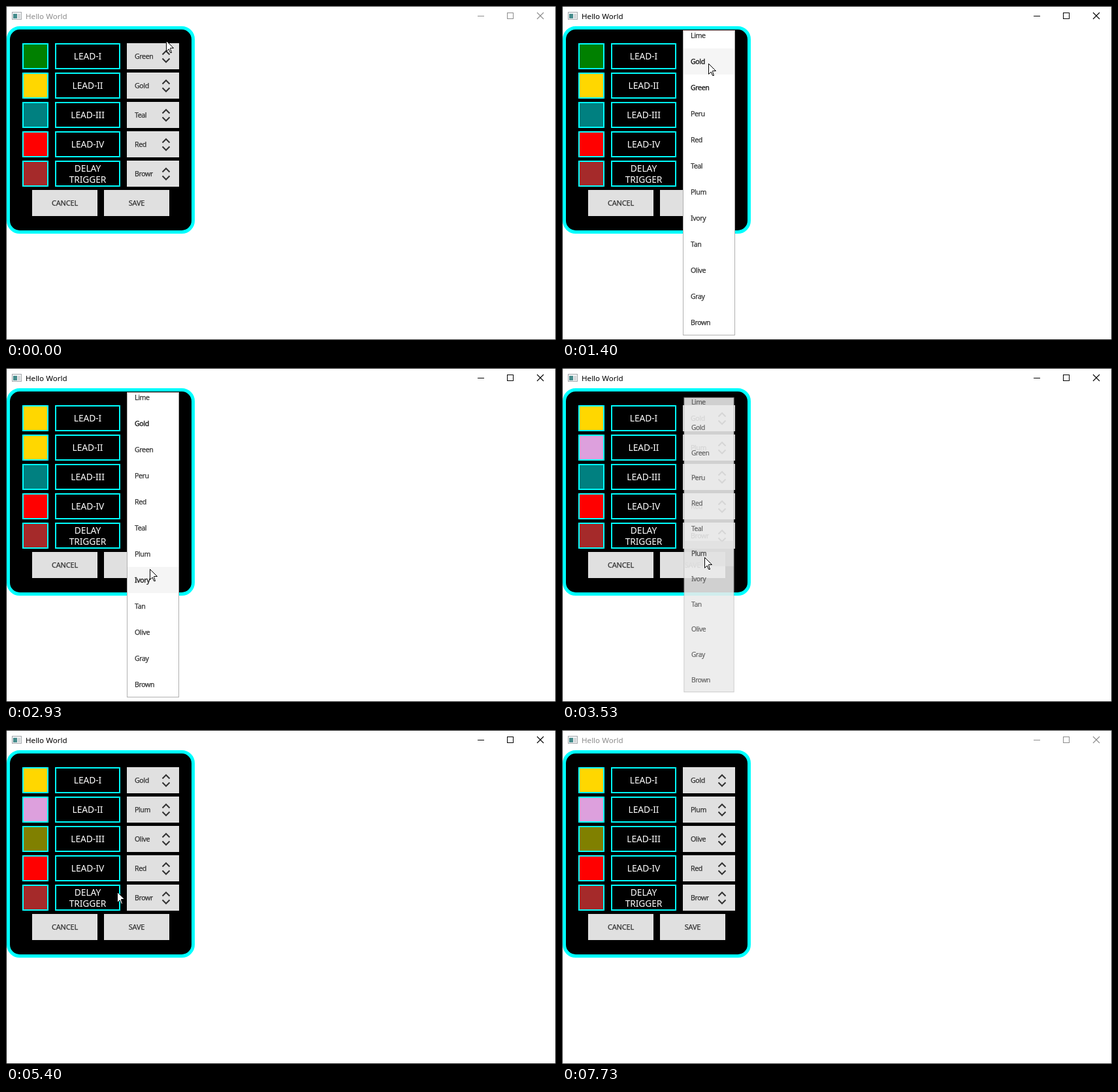
Recreate the animation shown at these times as an HTML page with a canvas. Size 842x512 px, loop 7.94 s.

```html
<!DOCTYPE html>
<html lang="en">
<head>
<meta charset="utf-8">
<title>Hello World</title>
<style>
  html, body { margin: 0; width: 100%; height: 100%; overflow: hidden; background: #fff; }
  canvas { display: block; }
</style>
</head>
<body>
<canvas id="stage" width="842" height="512"></canvas>
<script>
const ctx = document.getElementById('stage').getContext('2d');
const LOOP = 7940, STEP = 200 / 3;
const FADE_IN = 130, FADE_OUT = 200, PRESS = 150;
const FOCUS = 70, BLUR = 7730;
const FONT = '"Noto Sans", "Open Sans", sans-serif';
const CYAN = '#00ffff', GREY = '#e0e0e0';
const ROW = 40, LIST_TOP = 25;

const names = ['Lime', 'Gold', 'Green', 'Peru', 'Red', 'Teal', 'Plum', 'Ivory', 'Tan', 'Olive', 'Gray', 'Brown'];
const leads = [
  { label: ['LEAD-I'], color: 'Green' },
  { label: ['LEAD-II'], color: 'Gold' },
  { label: ['LEAD-III'], color: 'Teal' },
  { label: ['LEAD-IV'], color: 'Red' },
  { label: ['DELAY', 'TRIGGER'], color: 'Brown' }
];

const popups = [
  { lead: 0, open: 130, close: 1670, pick: 'Gold' },
  { lead: 1, open: 2200, close: 3470, pick: 'Plum' },
  { lead: 2, open: 3930, close: 4730, pick: 'Olive' }
];

const clamp = v => Math.max(0, Math.min(1, v));
const progress = (t, start, length) => clamp((t - start) / length);
const leadY = i => 57 + i * 45;
const optionY = name => LIST_TOP + names.indexOf(name) * ROW;

// The pointer glides to each stop and rests there until the next one.
const home = { x: 245, y: 53 };
const glide = (start, end, x, y) => ({ start, end, x, y });
const glides = [
  glide(70, 800, 230, optionY('Gold') + 20),
  glide(800, 870, 224, optionY('Green') + 8),
  glide(1000, 1400, 224, optionY('Gold') + 23),
  glide(2000, 2070, 227, leadY(1) + 1),
  glide(2330, 2930, 220, optionY('Ivory') + 3),
  glide(3060, 3330, 218, optionY('Plum') + 25),
  glide(3600, 3800, 237, leadY(2) + 12),
  glide(4130, 4470, 215, optionY('Olive') + 10),
  glide(5000, 5400, 170, 248),
  glide(5470, 5800, 146, 300),
  glide(6000, 6330, 171, 295),
  glide(6530, 6930, 98, 484)
];

function pointerAt(t) {
  let { x, y } = home;
  for (const stop of glides) {
    const k = progress(t, stop.start, stop.end - stop.start);
    x += (stop.x - x) * k;
    y += (stop.y - y) * k;
  }
  return { x: Math.round(x), y: Math.round(y) };
}

function rect(x, y, w, h, fill) {
  ctx.fillStyle = fill;
  ctx.fillRect(x, y, w, h);
}

function frame(x, y, w, h, fill) {
  rect(x, y, w, h, CYAN);
  rect(x + 2, y + 2, w - 4, h - 4, fill);
}

function line(color, width, ...points) {
  ctx.strokeStyle = color;
  ctx.lineWidth = width;
  ctx.beginPath();
  points.forEach(([x, y]) => ctx.lineTo(x, y));
  ctx.stroke();
}

function text(str, x, y, { size = 10.6, color = '#333', align = 'left', spacing = -0.4, boldness = 0.25 } = {}) {
  ctx.font = `${size}px ${FONT}`;
  ctx.letterSpacing = spacing + 'px';
  ctx.textAlign = align;
  ctx.fillStyle = color;
  ctx.fillText(str, x, y);
  if (boldness) {
    ctx.strokeStyle = color;
    ctx.lineWidth = boldness;
    ctx.strokeText(str, x, y);
  }
}

function drawWindow(active) {
  rect(0, 0, 842, 512, active ? '#1a1a1a' : '#3a3a3a');
  rect(1, 1, 840, 510, '#fff');

  rect(9, 9, 15, 12, '#a4a8ac');
  rect(10, 10, 13, 10, '#f2f4f5');
  rect(11, 12, 6, 7, '#468c8c');
  rect(18, 12, 4, 7, '#d4d8da');

  const ink = active ? '#000' : '#8c8c8c';
  text('Hello World', 30, 20, { size: 11.6, spacing: 0, boldness: 0, color: ink });
  line(ink, 1, [722, 15.5], [732, 15.5]);
  ctx.strokeRect(767.5, 10.5, 9, 9);
  line(ink, 1.1, [813, 10], [823, 20]);
  line(ink, 1.1, [823, 10], [813, 20]);
}

function drawPanel() {
  ctx.beginPath();
  ctx.roundRect(3.5, 33.5, 283, 313, 17.5);
  ctx.fillStyle = '#000';
  ctx.fill();
  ctx.strokeStyle = CYAN;
  ctx.lineWidth = 5;
  ctx.stroke();
}

function drawButton(label, x, fill) {
  rect(x, 282, 100, 40, fill);
  text(label, x + 50, 306, { size: 11, spacing: -0.2, align: 'center' });
}

function drawLead({ label }, color, y) {
  frame(25, y, 40, 40, color.toLowerCase());
  frame(75, y, 100, 40, '#000');
  label.forEach((part, i) => {
    const baseline = y + 25 + (label.length > 1 ? i * 17 - 8 : 0);
    text(part, 125, baseline, { size: 13.8, spacing: -0.1, boldness: 0, color: '#fff', align: 'center' });
  });

  rect(185, y, 80, 40, GREY);
  ctx.save();
  ctx.beginPath();
  ctx.rect(197, y, 28, 40);
  ctx.clip();
  text(color, 197, y + 24);
  ctx.restore();
  for (const side of [-1, 1]) {
    const base = y + 20.5 + side * 3;
    line('#333', 2, [239.5, base], [245, base + side * 5.5], [250.5, base]);
  }
}

function drawPopup({ lead, open, close, pick }, t, pointer) {
  const shown = progress(t, open, FADE_IN) - progress(t, close, FADE_OUT);
  if (shown <= 0) return;
  const scale = 0.9 + 0.1 * shown;
  const pressed = t >= close - PRESS;
  const current = t < close ? leads[lead].color : pick;
  const hovered = pressed ? pick : names[Math.floor((pointer.y - LIST_TOP) / ROW)];

  ctx.save();
  ctx.globalAlpha = shown;
  ctx.translate(225, 271);
  ctx.scale(scale, scale);
  ctx.translate(-225, -271);
  rect(185, 37, 80, 468, '#b0b0b0');
  rect(186, 38, 78, 466, '#fff');
  ctx.beginPath();
  ctx.rect(186, 38, 78, 466);
  ctx.clip();
  for (const name of names) {
    const y = optionY(name), over = name === hovered;
    if (over) rect(186, y, 78, ROW, pressed ? GREY : '#f5f5f5');
    const strong = over || name === current;
    text(name, 197, y + 24, strong ? { boldness: 0.4, color: '#222' } : {});
  }
  ctx.restore();
}

function drawPointer({ x, y }) {
  ctx.save();
  ctx.translate(x + 0.5, y + 0.5);
  const arrow = new Path2D('M0 0V16L3.7 12.5L6 18H8L6 12V11H11Z');
  ctx.fillStyle = '#fff';
  ctx.fill(arrow);
  ctx.strokeStyle = '#000';
  ctx.lineWidth = 1;
  ctx.stroke(arrow);
  ctx.restore();
}

function draw(ms) {
  // The picture advances 15 times a second.
  const t = Math.floor((ms + 4) / STEP) * STEP + 4;
  const pointer = pointerAt(t);

  drawWindow(t >= FOCUS && t < BLUR);
  drawPanel();
  leads.forEach((lead, i) => {
    const done = popups.find(p => p.lead === i && t >= p.close);
    drawLead(lead, done ? done.pick : lead.color, leadY(i));
  });
  drawButton('CANCEL', 40, GREY);
  drawButton('SAVE', 150, t >= 6200 && t < 6400 ? '#ccc' : GREY);
  popups.forEach(popup => drawPopup(popup, t, pointer));
  if (t < BLUR) drawPointer(pointer);
}

function tick() {
  draw(performance.now() % LOOP);
  requestAnimationFrame(tick);
}
tick();
</script>
</body>
</html>
```
